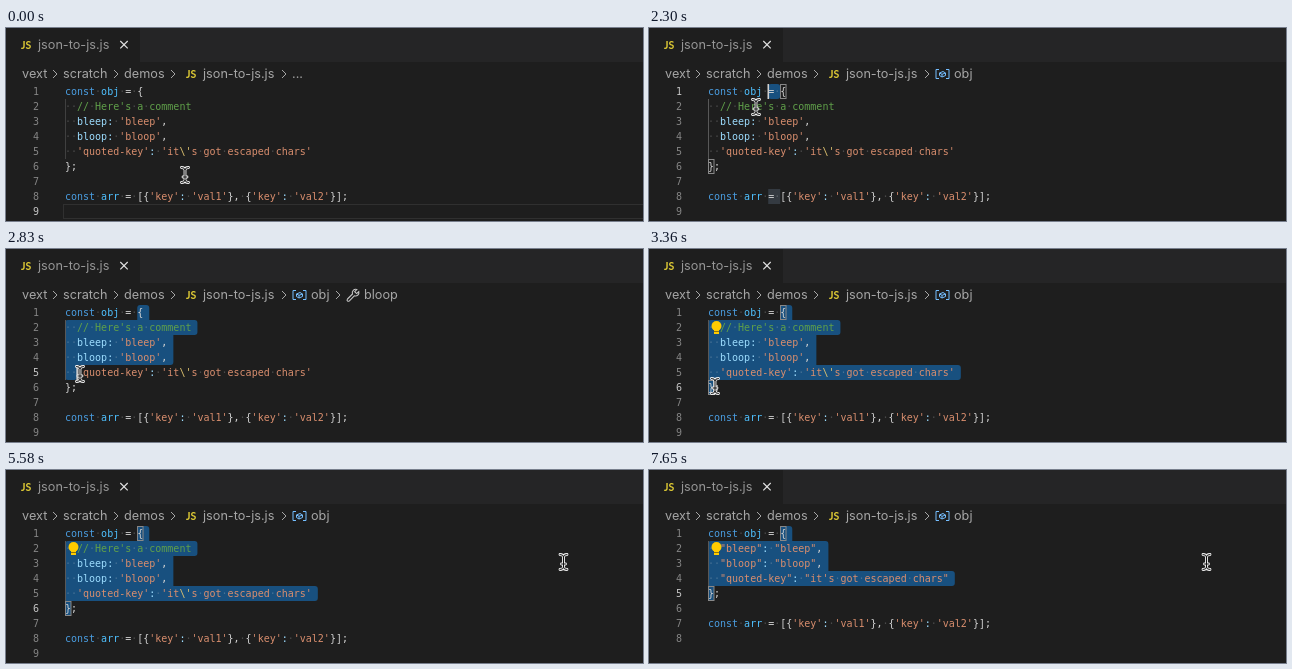
Recreate the animation shown at these times as an HTML page with a canvas. Size 637 by 193 pixels, loop 8000 ms.

```html
<!DOCTYPE html>
<html lang="en">
<head>
<meta charset="utf-8">
<title>Editor: object to JSON</title>
<style>
  html, body { margin: 0; height: 100%; overflow: hidden; background: #1e1e1e; }
  canvas { display: block; }
</style>
</head>
<body>
<canvas width="637" height="193"></canvas>
<script>
const ctx = document.querySelector('canvas').getContext('2d');
const LOOP = 8000, STEP = 88.7;
const LEFT = 59, TOP = 56, CHAR = 6.02, LINE = 15;
const MONO = '10px "DejaVu Sans Mono", monospace';
const UI = '12.7px Inter, sans-serif';
const ICON = 'bold 10.5px Lato, sans-serif';
const GREY = '#a6a6a6';

const tail = ['};', '', "const arr = [{'key': 'val1'}, {'key': 'val2'}];", ''];
const before = ['const obj = {', "  // Here's a comment", "  bleep: 'bleep',", "  bloop: 'bloop',",
  "  'quoted-key': 'it\\'s got escaped chars'", ...tail];
const after = ['const obj = {', '  "bleep": "bleep",', '  "bloop": "bloop",',
  '  "quoted-key": "it\'s got escaped chars"', ...tail];

// Steps of the clock at which things happen
const CLICK = 24, DRAG_END = 37, BULB = 38, EDIT = 70;
const blinks = [5, 11, 17, 22, 24, 42, 47, 52, 58, 63, 70, 75, 81, 86];
const anchor = [0, 12];
// step, x, y of the mouse
const path = [
  [7, 179, 147], [8, 177, 142], [10, 165, 118], [12, 147, 85], [14, 137, 68], [15, 135, 65], [18, 133, 64],
  [24, 133, 64], [25, 121, 69], [26, 107, 79], [28, 91, 93], [30, 77, 110], [31, 73, 118], [32, 74, 125],
  [34, 69, 133], [36, 66, 137], [41, 66, 137], [42, 240, 125], [43, 480, 97], [44, 557.5, 92]
];

function mouseAt(step) {
  const i = path.findIndex(p => p[0] >= step);
  if (i < 0) return path[path.length - 1].slice(1);
  if (i === 0) return path[0].slice(1);
  const [a, b] = [path[i - 1], path[i]];
  const f = (step - a[0]) / (b[0] - a[0]);
  return [a[1] + (b[1] - a[1]) * f, a[2] + (b[2] - a[2]) * f];
}

// The caret follows the dragging mouse one step late
function caretAt(step) {
  if (step < CLICK) return [8, 0];
  if (step >= EDIT) return [4, 1];
  const [x, y] = mouseAt(Math.min(step, DRAG_END) - 1);
  const row = Math.floor((y - TOP) / LINE);
  return [row, Math.min(Math.floor((x - LEFT) / CHAR), before[row].length)];
}

const colX = col => LEFT + col * CHAR;
const rowY = row => TOP + row * LINE;

function text(str, x, y, color, font) {
  ctx.font = font;
  ctx.fillStyle = color;
  ctx.fillText(str, x, y);
}

function rect(x, y, w, h, color) {
  ctx.fillStyle = color;
  ctx.fillRect(x, y, w, h);
}

function stroke(shape, color, width, x = 0, y = 0) {
  ctx.save();
  ctx.translate(x, y);
  ctx.strokeStyle = color;
  ctx.lineWidth = width;
  ctx.stroke(new Path2D(shape));
  ctx.restore();
}

function tokenColor(token) {
  if (token.startsWith('//')) return '#60a04a';
  if (/^['"]/.test(token)) return '#d98e6e';
  if (token === 'const') return '#4a9de0';
  if (/^(obj|arr)$/.test(token)) return '#4fc1ff';
  return token.endsWith(':') ? '#9cdcfe' : '#d4d4d4';
}

function drawCode(lines, activeRow) {
  lines.forEach((line, row) => {
    const y = rowY(row) + 11;
    text(row + 1, 27, y, row === activeRow ? '#c6c6c6' : '#858585', MONO);
    for (const m of line.matchAll(/\/\/.*|'(?:\\.|[^'\\])*'|"[^"]*"|\w+:?|[^\s\w]/g)) {
      let col = m.index;
      for (const part of m[0].split(/(\\.)/)) {
        text(part, colX(col), y, part[0] === '\\' ? '#dcc06e' : tokenColor(m[0]), MONO);
        col += part.length;
      }
    }
    for (const m of line.matchAll(/ /g)) text('·', colX(m.index), y, 'rgba(227,228,226,.22)', MONO);
  });
}

function drawSelection(lines, from, to) {
  const spans = [];
  for (let row = from[0]; row <= to[0]; row++) {
    const start = row === from[0] ? from[1] : 0;
    const end = row === to[0] ? to[1] : lines[row].length + 1;
    spans.push([start, end]);
  }
  ctx.fillStyle = '#18507f';
  spans.forEach(([start, end], i) => {
    if (end === start) return;
    const [prev, next] = [spans[i - 1], spans[i + 1]];
    const corners = [!prev || prev[0] > start, !prev || prev[1] < end, !next || next[1] < end, !next];
    ctx.beginPath();
    ctx.roundRect(colX(start), rowY(from[0] + i), (end - start) * CHAR, LINE, corners.map(c => c ? 3 : 0));
    ctx.fill();
  });
}

function drawHeader(step) {
  rect(134, 0, 503, 34, '#252526');
  text('JS', 15, 20.5, '#e0cc35', ICON);
  text('json-to-js.js', 32, 21, '#969696', UI);
  stroke('M-3.7-3.7 3.7 3.7M3.7-3.7-3.7 3.7', '#e0e0e0', 1.2, 118, 16.7);

  const crumb = (str, x) => text(str, x, 50, GREY, UI);
  const chevron = x => stroke('M-2-4 2 0-2 4', GREY, 1, x, 46);
  crumb('vext', 16);
  crumb('scratch', 57);
  crumb('demos', 118);
  text('JS', 180, 49.5, '#e0cc35', ICON);
  crumb('json-to-js.js', 197);
  [49, 110, 167, 278].forEach(chevron);
  if (step < CLICK) return crumb('...', 286);

  stroke('M3.5.5H.5V9.5H3.5M10.5.5H13.5V9.5H10.5M4 4 7.5 2.5 10 4V6.5L6.5 8 4 6.5ZM4 4 6.5 5.3 10 4M6.5 5.3V8',
    '#75beff', 1, 286.5, 41);
  crumb('obj', 305);
  const member = step < 30 || step >= BULB ? '' : step < 34 ? 'bloop' : 'quoted-key';
  if (!member) return;
  chevron(332);
  stroke('M1.5 10.5 6.5 5.5C5.5 2.5 8 .2 10.8 1L8.7 3.2 10.6 5.1 12.8 3C13.5 6 11 8.2 8.3 7.3L3.4 12.3C2 13.5.2 12 1.5 10.5Z',
    '#c5c5c5', 1.1, 340, 39.5);
  crumb(member, 358);
}

function drawBulb() {
  ctx.fillStyle = '#ffcc00';
  ctx.beginPath();
  ctx.arc(67.5, 77, 5, 0, 7);
  ctx.fill();
  ctx.fillRect(65, 80, 5, 5);
  rect(65, 82, 5, 1, '#8a7410');
}

function drawMouse([x, y]) {
  const beam = 'M-3.5-7.5Q0-7.5 0-5Q0-7.5 3.5-7.5M0-5V5M-3.5 7.5Q0 7.5 0 5Q0 7.5 3.5 7.5M-2 2H2';
  ctx.lineCap = 'round';
  stroke(beam, '#f4f4f4', 2.8, x, y);
  stroke(beam, '#111', 1, x, y);
  ctx.lineCap = 'butt';
}

function draw(t) {
  const step = Math.floor((t + 20) / STEP);
  const lines = step < EDIT ? before : after;
  const caret = caretAt(step);
  const closing = lines.indexOf('};');
  const order = caret[0] - anchor[0] || caret[1] - anchor[1];
  const selected = step >= CLICK && order !== 0;

  rect(0, 0, 637, 193, '#1e1e1e');
  drawHeader(step);

  if (!selected) {
    ctx.strokeStyle = '#303030';
    ctx.lineWidth = 1;
    ctx.strokeRect(57.5, rowY(caret[0]) + .5, 590, LINE - 1);
  } else {
    drawSelection(lines, ...(order > 0 ? [anchor, caret] : [caret, anchor]));
    if (order < 0) rect(colX(10), rowY(closing + 2), 2 * CHAR, LINE, '#343a41');
  }
  rect(LEFT, rowY(1), 1, (closing - 1) * LINE, step < CLICK ? '#404040' : '#585858');

  if (step >= CLICK && (caret[0] === 0 || caret[0] === closing)) {
    ctx.strokeStyle = '#888';
    ctx.lineWidth = 1;
    ctx.strokeRect(colX(12) + .3, rowY(0) + .5, 5.5, LINE - 1);
    ctx.strokeRect(LEFT + .5, rowY(closing) + .5, 5.5, LINE - 1);
  }
  drawCode(lines, caret[0]);
  if (blinks.filter(b => b <= step).length % 2) {
    rect(colX(caret[1]) - (caret[1] ? .7 : 0), rowY(caret[0]), 1.6, LINE, '#d0d0d0');
  }
  if (step >= BULB) drawBulb();
  drawMouse(mouseAt(step));
}

function frame() {
  draw(performance.now() % LOOP);
  requestAnimationFrame(frame);
}
frame();
</script>
</body>
</html>
```
